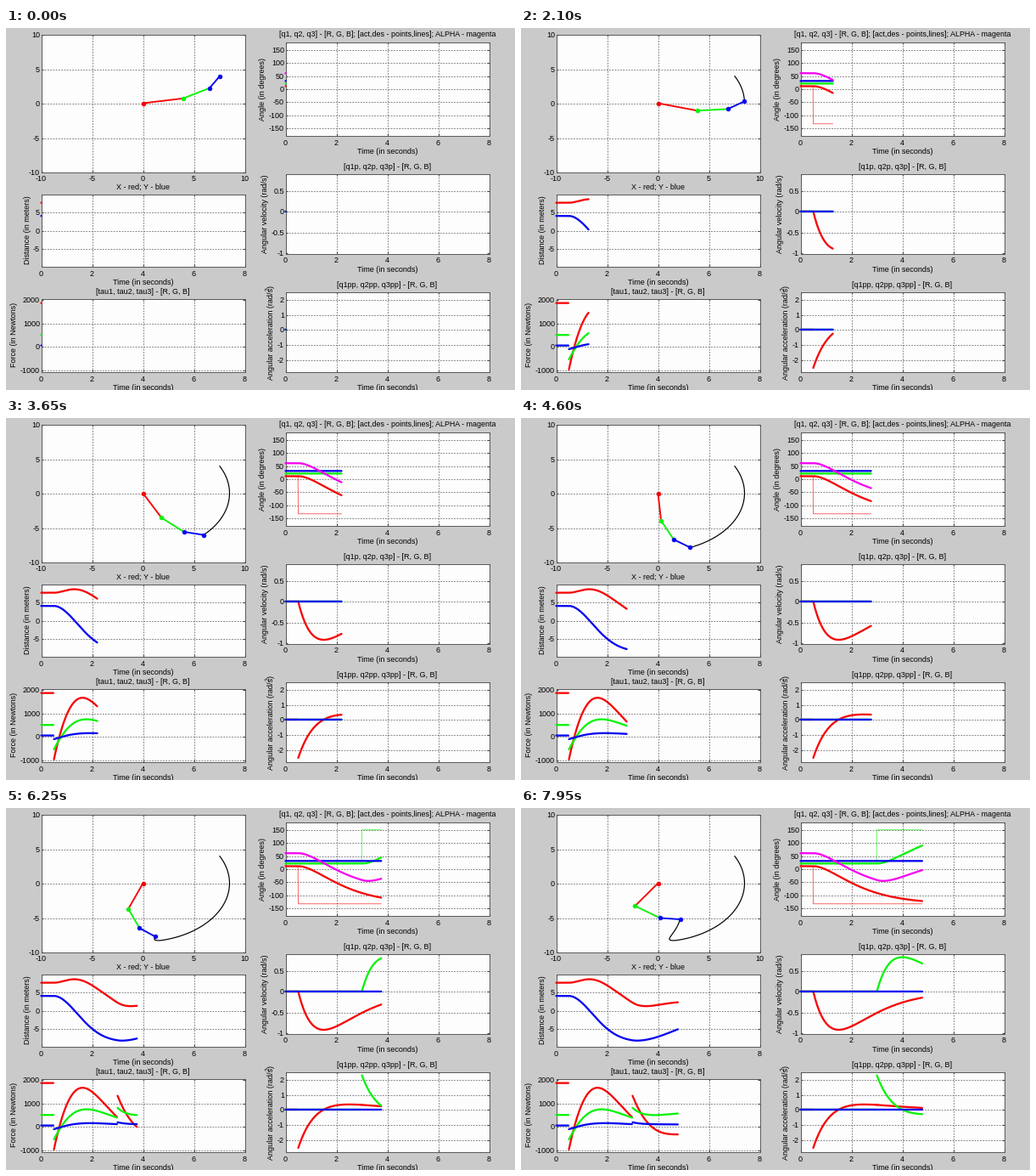
Recreate the animation shown at these times as a matplotlib script. Size 600 by 426 pixels, loop 8000 ms.

```python
import numpy as np
import matplotlib.pyplot as plt
from matplotlib.animation import FuncAnimation
from matplotlib.patches import Rectangle

W, H, DPI = 600, 426, 96
PT = 72 / DPI                      # points per pixel
FRAMES, INTERVAL, STRIDE, DT = 160, 50, 3, 0.01
RED, GREEN, BLUE, MAGENTA = "#f50505", "#08f308", "#0505f0", "#f505f0"
RGB = [RED, GREEN, BLUE]

plt.rcParams["font.family"] = "Liberation Sans"
fig = plt.figure(figsize=(W / DPI, H / DPI), dpi=DPI, facecolor="#cbcacb")
ax = fig.add_axes([0, 0, 1, 1])
ax.set_xlim(0, W)
ax.set_ylim(H, 0)
ax.set_axis_off()


# ---- three-link arm: critically damped joints, inverse dynamics ----
N = FRAMES * STRIDE + 2
t = np.arange(N) * DT
length = np.array([4.0, 3.0, 2.0])
mass = np.array([20.0, 15.0, 10.0])
friction = np.array([200.0, 100.0, 50.0])
start = np.array([10.0, 20.0, 30.0])
goal = np.array([-135.0, 150.0, 30.0])
step_at = np.array([50, 300, N])   # sample index of each joint's step

k = np.arange(N)
on = k >= step_at[:, None]
s = np.where(on, (k - step_at[:, None]) * DT, 0)
amp = np.radians(goal - start)[:, None]
q = np.radians(start)[:, None] + amp * (1 - (1 + s) * np.exp(-s))
qp = amp * s * np.exp(-s)
qpp = on * amp * (1 - s) * np.exp(-s)
desired = np.where(on, goal[:, None], start[:, None])

th, thp, thpp = (np.cumsum(a, axis=0) for a in (q, qp, qpp))
c, sn = np.cos(th), np.sin(th)
span = length[:, None, None] * np.stack([c, sn], axis=2)
accel = length[:, None, None] * np.stack(
    [-c * thp**2 - sn * thpp, -sn * thp**2 + c * thpp], axis=2)
tips = np.cumsum(span, axis=0)
joints = tips - span
centers = tips - span / 2
pull = np.cumsum(accel, axis=0) - accel / 2 + np.array([0, 9.81])


def torque(i):
    total = friction[i] * qp[i]
    for j in range(i, 3):
        r = centers[j] - joints[i]
        total = total + mass[j] * (r[:, 0] * pull[j, :, 1] - r[:, 1] * pull[j, :, 0])
    return total


tau = np.array([torque(i) for i in range(3)])
for curve in (tau, qpp):           # leave a gap at each step
    curve[:, step_at[:2] - 1] = np.nan


# ---- static panels ----
def write(x, y, text, ha="center", size=9, rot=0):
    ax.text(x, y, text, ha=ha, va="baseline", fontsize=size * PT,
            rotation=rot, rotation_mode="anchor", color="black")


class Panel:
    def __init__(self, box, xr, yr, xticks, yticks):
        self.box, self.xr, self.yr = box, xr, yr
        l, tp, r, b = box
        ax.add_patch(Rectangle((l, tp), r - l, b - tp, fc="#fefdfe",
                               ec="#5c5c5c", lw=PT, zorder=1))
        xs = np.floor(self.x(np.array(xticks, float))) + 0.5
        ys = np.floor(self.y(np.array(yticks, float))) + 0.5
        grid = dict(colors="#777777", lw=0.9 * PT, zorder=2,
                    linestyles=(0, (2, 1.6)))
        ax.vlines(xs[(xs > l + 1) & (xs < r - 1)], tp, b, **grid)
        ax.hlines(ys[(ys > tp + 1) & (ys < b - 1)], l, r, **grid)
        tick = dict(colors="#444444", lw=PT, zorder=2)
        for a, z in ((tp, tp + 2.5), (b - 2.5, b)):
            ax.vlines(xs, a, z, **tick)
        for a, z in ((l, l + 2.5), (r - 2.5, r)):
            ax.hlines(ys, a, z, **tick)
        for x, v in zip(xs, xticks):
            write(x, b + 11, f"{v:g}")
        for y, v in zip(ys, yticks):
            write(l - 1.5, y + 3.2, f"{v:g}", ha="right")

    def x(self, v):
        l, _, r, _ = self.box
        return l + (v - self.xr[0]) / (self.xr[1] - self.xr[0]) * (r - l)

    def y(self, v):
        _, tp, _, b = self.box
        return b - (v - self.yr[0]) / (self.yr[1] - self.yr[0]) * (b - tp)


def time_panel(box, yr, yticks, title, title_y, label, label_x, label_y,
               title_size=9):
    p = Panel(box, (0, 8), yr, range(0, 9, 2), yticks)
    mid = (box[0] + box[2]) / 2
    write(mid + 0.5, box[3] + 21.3, "Time (in seconds)")
    write(mid, title_y, title, size=title_size)
    write(label_x, label_y, label, rot=90)
    return p


arm = Panel((41.5, 7.5, 281.5, 169.5), (-10, 10), (-10, 10),
            range(-10, 11, 5), range(-10, 11, 5))
dist = time_panel((41.5, 195.5, 281.5, 280.5), (-9.9, 9.9), (5, 0, -5),
                  "X - red; Y - blue", 189.6, "Distance (in meters)", 27.6, 238)
force = time_panel((41.5, 318.5, 281.5, 404.5), (-1063, 2033),
                   (2000, 1000, 0, -1000),
                   "[tau1, tau2, tau3] - [R, G, B]", 313.2,
                   "Force (in Newtons)", 12, 361)
angle = time_panel((329.5, 16.5, 569.5, 126.5), (-180, 180),
                   range(150, -151, -50),
                   "[q1, q2, q3] - [R, G, B]; [act,des - points,lines]; "
                   "ALPHA - magenta", 10.3, "Angle (in degrees)", 305, 72,
                   title_size=8.85)
vel = time_panel((329.5, 171.5, 569.5, 265.5), (-1.024, 0.918),
                 (0.5, 0, -0.5, -1), "[q1p, q2p, q3p] - [R, G, B]", 166.3,
                 "Angular velocity (rad/s)", 308, 218.6)
acc = time_panel((329.5, 310.5, 569.5, 404.5), (-2.784, 2.496),
                 (2, 1, 0, -1, -2), "[q1pp, q2pp, q3pp] - [R, G, B]", 304.6,
                 "Angular acceleration (rad/s)", 315, 358.3)
write(310.5, 307.5, "2", size=6.5, rot=90)


# ---- moving curves ----
curves = []


def add_curve(p, values, color, width=2.3, alpha=1.0):
    line, = ax.plot([], [], color=color, lw=width * PT, alpha=alpha, zorder=4,
                    solid_capstyle="round", solid_joinstyle="round", snap=False)
    curves.append((line, p.x(t), p.y(values)))


for i, col in enumerate(RGB):
    add_curve(angle, desired[i], col, 0.9, 0.65)
for p, data in ((angle, np.degrees(q)), (vel, qp), (acc, qpp), (force, tau)):
    for values, col in zip(data, RGB):
        add_curve(p, values, col)
add_curve(angle, np.degrees(th[2]), MAGENTA)
add_curve(dist, tips[2, :, 0], RED)
add_curve(dist, tips[2, :, 1], BLUE)

chain_x = arm.x(np.concatenate([joints[:1, :, 0], tips[:, :, 0]]))
chain_y = arm.y(np.concatenate([joints[:1, :, 1], tips[:, :, 1]]))
trail, = ax.plot([], [], color="black", lw=1.2 * PT, zorder=5, snap=False)
links = [ax.plot([], [], color=col, lw=1.9 * PT, zorder=6, snap=False)[0]
         for col in RGB]
dots = [ax.plot([], [], "o", color=col, ms=5 * PT, mew=0.5 * PT, zorder=7)[0]
        for col in RGB + [BLUE]]


def draw(n):
    now = n * STRIDE
    for line, x, y in curves:
        line.set_data(x[:now + 2], y[:now + 2])
    trail.set_data(chain_x[3, :now + 1], chain_y[3, :now + 1])
    for i, link in enumerate(links):
        link.set_data(chain_x[i:i + 2, now], chain_y[i:i + 2, now])
    for i, dot in enumerate(dots):
        dot.set_data([chain_x[i, now]], [chain_y[i, now]])
    return []


anim = FuncAnimation(fig, draw, frames=FRAMES, init_func=lambda: draw(0),
                     interval=INTERVAL, repeat=True, repeat_delay=0, blit=False)
plt.show()
```
